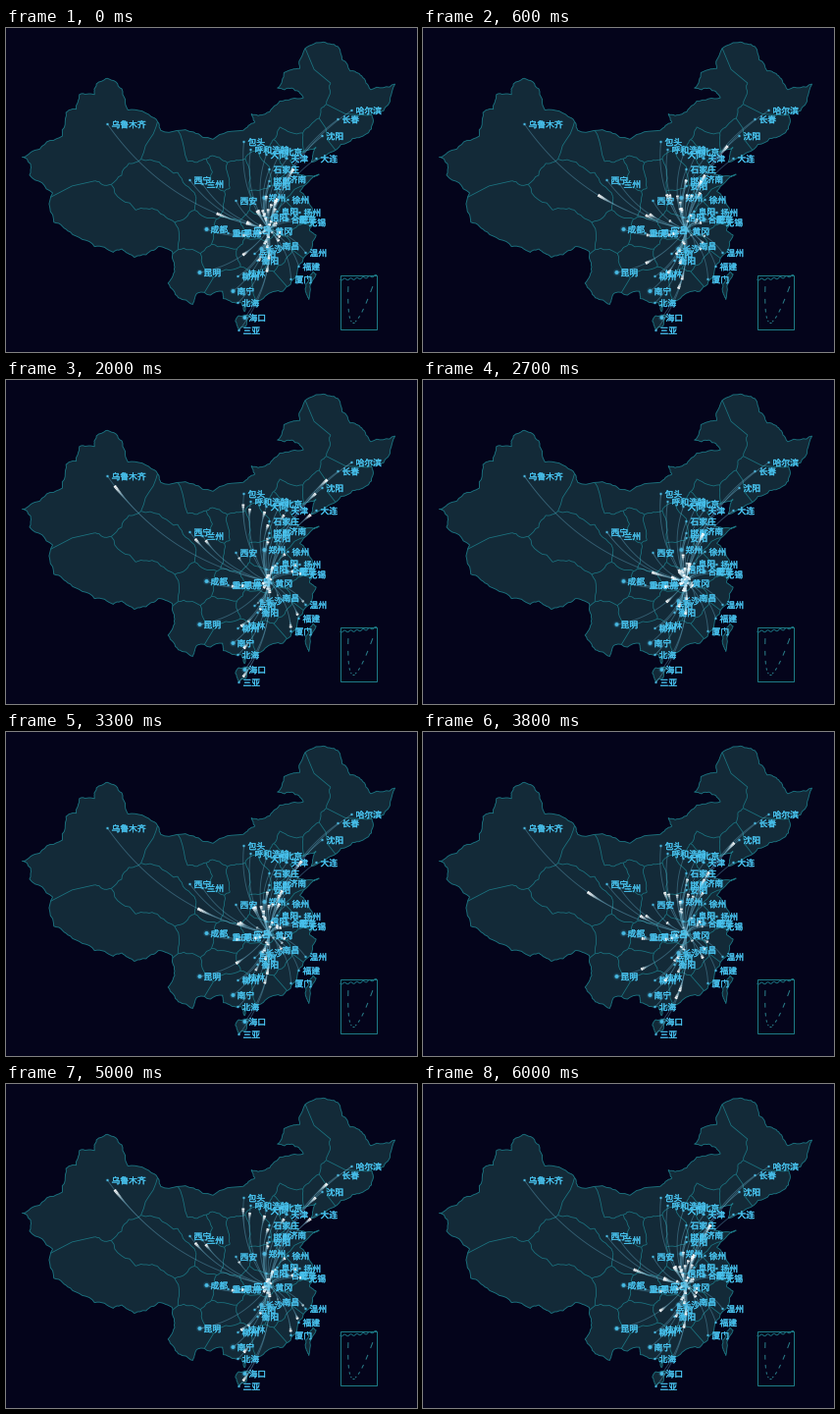
A matplotlib script that plays this animation: 419 px wide and 330 px high, repeating every 6100 ms.

```python
import math
import random
from itertools import combinations

import matplotlib.pyplot as plt
import numpy as np
from matplotlib import patheffects
from matplotlib.animation import FuncAnimation
from matplotlib.collections import EllipseCollection, LineCollection
from matplotlib.patches import Polygon, Rectangle

W, H, DPI = 419, 330, 128
PT = 72 / DPI                      # points per pixel
FRAMES, STEP, PERIOD = 61, 100, 3000
BG, LAND, BORDER, GLOW = "#04041b", "#132a38", "#1b7481", "#48c2ee"
HUB = np.array([268, 205])

plt.rcParams["font.family"] = "Noto Sans CJK JP"
rng = random.Random(7)

# Key points of the coast and land border, (longitude, latitude), clockwise.
NORTH = [
    (73.6, 39.4), (76.5, 40.4), (80.2, 42), (80.8, 44.9), (82.5, 45.3), (83, 47.1),
    (85.5, 47.1), (85.8, 48.4), (87.6, 49.1), (90, 47.8), (91, 45.2), (95.4, 44.2),
    (96.4, 42.7), (101.8, 42.5), (105, 41.6), (110, 42.7), (111.9, 43.7), (111.3, 44.7),
    (113.6, 44.7), (116, 46.3), (119.9, 46.7), (118, 47.9), (115.6, 47.9), (116.7, 49.8),
    (119.3, 50.3), (120, 52.5), (122.8, 53.5), (125.6, 53), (127.6, 50), (129.5, 49.4),
    (131, 47.7), (135, 48.4), (133.1, 45.1), (131, 44.8), (131.3, 43.5), (130.6, 42.4),
    (128, 41.7), (124.4, 40),
]
SOUTH = [
    (121.2, 38.8), (122, 40.6), (119.9, 40), (117.7, 39), (119, 37.3), (122.5, 37.3),
    (119.3, 35.2), (121.9, 31.7), (120.9, 30.4), (122, 29.8), (121.2, 28), (118.8, 24.8),
    (116.5, 22.9), (113.6, 22.3), (110.4, 21.3), (110.2, 20.4), (109.7, 21.5), (106.7, 22),
    (106.6, 22.9), (102.5, 22.7), (101.7, 21.3), (99.3, 22.1), (97.6, 23.9), (98.7, 25.9),
    (98.3, 27.8), (96, 28.4), (94, 27.4), (92, 27.1), (90, 28.1), (88.6, 27.7), (85.5, 28.4),
    (81.5, 30.2), (78.8, 31.4), (78.6, 35), (74.8, 37.2), (75, 38.5), (73.6, 39.4),
]
HAINAN = [(108.7, 19.2), (109.3, 19.9), (111, 19.9), (110.4, 18.6), (109.3, 18.2), (108.7, 19.2)]
TAIWAN = [(121.5, 25.3), (122, 25), (120.8, 21.9), (120.2, 23.2), (121.5, 25.3)]

# Centres of each province; borders run halfway between neighbours.
PROVINCES = [
    [(80, 38.7), (87, 41), (92, 42.5)], [(82, 32.6), (88, 31), (95, 29.8)],
    [(95, 36), (99.5, 34.5)], [(97.5, 40.3), (103, 36.5), (104.8, 34.2)],
    [(102, 41.6), (108, 40.6), (113, 42.6), (118.5, 44.5), (121, 48.5)],
    [(106.2, 37)], [(109, 37.2), (108.5, 33.8)], [(112.3, 37.5)],
    [(115, 38.3), (117.3, 41)], [(116.4, 40.1)], [(117.3, 39.2)], [(122.5, 41.2)],
    [(126.3, 43.3)], [(127.5, 47.5), (125, 51)], [(118.2, 36.3)], [(113.6, 33.8)],
    [(119.7, 33.3)], [(117.2, 31.9)], [(112.3, 31)], [(120.2, 29.2)], [(115.6, 27.6)],
    [(111.6, 27.6)], [(118, 26)], [(113.5, 23.3)], [(108.5, 23.8)], [(106.8, 26.9)],
    [(101.5, 24.8)], [(107.5, 29.8)], [(102.8, 30.5)],
]

# Where each label starts, in pixels.
CITIES = {
    "乌鲁木齐": (108, 98), "哈尔滨": (357, 84), "长春": (343, 93), "沈阳": (327, 110),
    "大连": (321, 133), "包头": (247, 116), "呼和浩特": (254, 124), "北京": (285, 126),
    "天津": (291, 133), "大同": (270, 129), "石家庄": (273, 144), "济南": (289, 154),
    "邯郸": (273, 156), "安阳": (273, 161), "西宁": (192, 155), "兰州": (205, 159),
    "西安": (239, 176), "郑州": (268, 173), "徐州": (292, 175), "阜阳": (281, 187),
    "扬州": (304, 188), "合肥": (291, 195), "南京": (299, 195), "无锡": (309, 198),
    "信阳": (270, 193), "成都": (209, 205), "重庆": (231, 209), "恩施": (243, 209),
    "宜昌": (253, 206), "黄冈": (275, 207), "南昌": (282, 222), "长沙": (265, 225),
    "岳阳": (258, 230), "衡阳": (261, 237), "温州": (310, 229), "福建": (303, 243),
    "厦门": (295, 256), "昆明": (202, 249), "桂林": (247, 250), "柳州": (241, 253),
    "南宁": (236, 268), "北海": (241, 280), "海口": (248, 295), "三亚": (242, 308),
}
MAJOR = "北京 济南 郑州 合肥 成都 长沙 昆明 南宁 海口".split()
EARLY = MAJOR + ["哈尔滨"]         # comets that run ahead of the rest


def project(points):
    lon, lat = np.array(points).T
    return np.column_stack([6.19 * lon - 439, 457.8 - 8.28 * lat])


def rough(pts, amount=.13, levels=3):
    """Displace midpoints repeatedly to make a natural border."""
    for _ in range(levels):
        d = np.diff(pts, axis=0)
        shift = np.array([[rng.uniform(-amount, amount)] for _ in d])
        mid = (pts[1:] + pts[:-1]) / 2 + shift * np.column_stack([-d[:, 1], d[:, 0]])
        out = np.empty((2 * len(pts) - 1, 2))
        out[::2], out[1::2] = pts, mid
        pts = out
    return pts


def province_borders():
    """Edges of the nearest-centre cells between different provinces."""
    owner = [i for i, group in enumerate(PROVINCES) for _ in group]
    seeds = project([p for group in PROVINCES for p in group])
    edges = []
    for i, j in combinations(range(len(seeds)), 2):
        if owner[i] == owner[j]:
            continue
        a, b = seeds[i], seeds[j]
        mid, along = (a + b) / 2, np.array([a[1] - b[1], b[0] - a[0]])
        along = along / np.hypot(*along)
        low, high = -150, 150
        for k, c in enumerate(seeds):
            if k in (i, j):
                continue
            slope = 2 * (c - a) @ along
            room = c @ c - a @ a - 2 * (c - a) @ mid
            if slope > 0:
                high = min(high, room / slope)
            elif slope < 0:
                low = max(low, room / slope)
        if low < high:
            edges.append(rough(np.array([mid + low * along, mid + high * along])))
    return edges


def bezier(a, ctrl, b, u):
    u = np.asarray(u)[:, None]
    return (1 - u) ** 2 * a + 2 * u * (1 - u) * ctrl + u ** 2 * b


def arc(end, curve=.2):
    """Bent path from the hub to a city, with its parameter values."""
    dx, dy = end - HUB
    ctrl = (HUB + end) / 2 + curve * np.array([dy, -dx])
    u = np.linspace(0, 1, max(10, int(math.hypot(dx, dy) / 1.6)))
    return u, bezier(HUB, ctrl, end, u)


fig = plt.figure(figsize=(W / DPI, H / DPI), dpi=DPI, facecolor=BG)
ax = fig.add_axes([0, 0, 1, 1])
ax.set_xlim(0, W)
ax.set_ylim(H, 0)
ax.axis("off")


def add_lines(segments, color, width, z, **style):
    return ax.add_collection(LineCollection(segments, colors=color, linewidths=width * PT,
                                            zorder=z, **style))


def draw_map():
    main, *_ = [ax.add_patch(Polygon(rough(project(shape)), fc=LAND, ec=BORDER,
                                     lw=.9 * PT, zorder=1))
                for shape in (NORTH + SOUTH, HAINAN, TAIWAN)]
    add_lines(province_borders(), BORDER, .8, 2).set_clip_path(main)


def draw_inset():
    left, top, width, height = 340.5, 252, 37.5, 55
    ax.add_patch(Rectangle((left, top), width, height, fill=False, ec="#1d7b86",
                           lw=PT, zorder=2))
    x = np.linspace(0, width, 40)
    add_lines([np.column_stack([left + x, top + 4 - 4 * (x / width) ** 2 + np.sin(x)])],
              BORDER, .9, 2)
    for u in np.linspace(.04, .96, 11):
        dash = bezier(np.array([349, 260]), np.array([346, 340]), np.array([375, 260]),
                      [u - .02, u + .02])
        add_lines([dash], "#2a7f8b", 1, 2)


draw_map()
draw_inset()

dots = np.array([(x - 4.5, y) for x, y in CITIES.values()] + [tuple(HUB)])
radii = np.array([1.9 if name in MAJOR else 1 for name in CITIES] + [2.2])
bolder = [patheffects.withStroke(linewidth=.3 * PT, foreground=GLOW)]
for name, (x, y) in CITIES.items():
    ax.text(x - .5, y, name, color=GLOW, size=8.8 * PT, va="center_baseline", zorder=5,
            path_effects=bolder)


def add_discs(alpha, z):
    group = EllipseCollection(2 * radii, 2 * radii, 0 * radii, units="xy", offsets=dots,
                              offset_transform=ax.transData, facecolors=GLOW,
                              edgecolors="none", alpha=alpha, zorder=z)
    return ax.add_collection(group)


add_discs(.9, 4)
ripples = [add_discs(.2, 3) for _ in range(2)]

# Curves are cut into short pieces whose brightness depends on the comet's age there.
curves, pieces, where, lead = [], [], [], []
for name, end in zip(CITIES, dots):
    u, pts = arc(end)
    start = .25 + (.2 if name in EARLY else 0) + rng.uniform(-.03, .03)
    curves.append(pts)
    pieces += list(np.stack([pts[:-1], pts[1:]], axis=1))
    where.append((u[:-1] + u[1:]) / 2)
    lead.append(np.full(len(u) - 1, start))
where, lead = np.concatenate(where), np.concatenate(lead)

add_lines(curves, "#6ab4d0", .9, 4, alpha=.38)
trails = add_lines(pieces, "white", 1, 6, capstyle="butt")


def update(i):
    now = i * STEP / PERIOD
    age = (lead + now - where) % 1
    tail, head = np.exp(-age / .13), np.exp(-(age / .06) ** 2)
    trails.set_color(np.column_stack([.55 + .45 * head, .8 + .2 * head, .9 + .1 * head,
                                      np.clip(.45 * tail + .55 * head, 0, 1)]))
    trails.set_linewidth((.9 + .7 * tail + 1.3 * head) * PT)

    for k, ring in enumerate(ripples):
        phase = (now + k / len(ripples)) % 1
        ring.set_widths(2 * radii * (1 + 1.3 * phase))
        ring.set_heights(2 * radii * (1 + 1.3 * phase))
        ring.set_alpha(.4 * (1 - phase))
    return [trails, *ripples]


anim = FuncAnimation(fig, update, frames=FRAMES, interval=STEP, repeat=True,
                     repeat_delay=0, blit=False)
plt.show()
```
